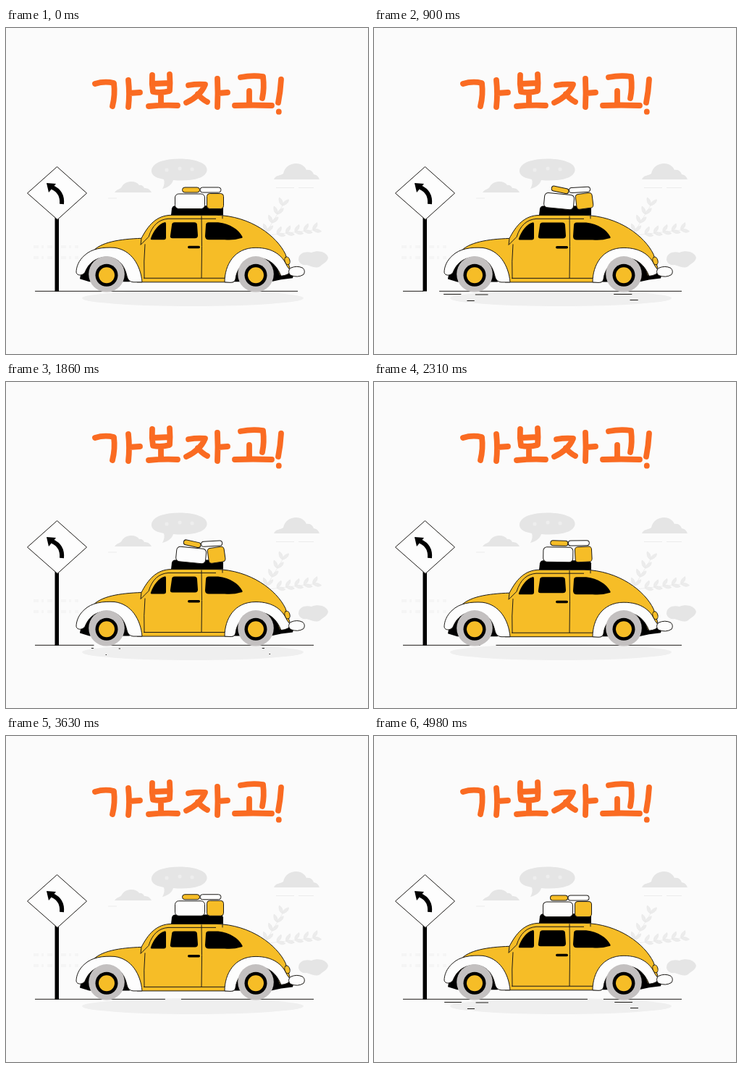
An HTML page for the animation above (5010 ms loop, 500x450 px).

```html
<!DOCTYPE html>
<html lang="ko">
<head>
<meta charset="utf-8">
<title>가보자고!</title>
<style>
html, body { margin: 0; width: 100%; height: 100%; overflow: hidden; background: #fbfbfb; }
svg { display: block; width: 100vw; height: 100vh; }
.ink { stroke: #1c1a17; stroke-width: 1; }
.yellow { fill: #f6bd27; }
.white { fill: #fdfdfd; }
.line { fill: none; }
#bags rect { transform-box: fill-box; transform-origin: center; }
</style>
</head>
<body>
<svg viewBox="0 0 500 450">
  <defs>
    <path id="leaf" d="M0 0C2 -4 6 -5 11 -4C9 0 5 1 0 0Z"/>
    <g id="wheel">
      <circle r="24.8" cy="-1.5" fill="#c3c0c0"/>
      <circle r="15.5"/>
      <circle r="11" class="yellow"/>
    </g>
  </defs>

  <!-- lettering -->
  <g role="img" aria-label="가보자고!" fill="none" stroke="#fa6b22" stroke-width="7.8" stroke-linecap="round" stroke-linejoin="round">
    <path d="M123 77Q136 73 149 76Q151 92 147 108M169 72Q171 91 169 109M170 90L185 89"/>
    <path d="M202 65Q201 77 203 88Q214 90 226 87Q227 76 226 64M203 77L226 76M214 90V106M197 108Q218 106 237 107"/>
    <path d="M252 79Q264 77 275 78C271 88 262 97 249 103M265 91Q270 98 278 102M292 70Q293 90 292 109M293 90L306 89"/>
    <path d="M324 68Q340 65 355 67Q357 83 354 97M336 87V105M316 107Q341 106 367 107"/>
    <path d="M380 71Q379 88 376 103M376.8 115.5V115.7"/>
  </g>

  <!-- pale scenery -->
  <g fill="#e5e5e5">
    <path d="M210 207C196 202 199 189 214 184C232 178 259 180 270 186C282 192 279 203 267 207C256 211 242 211 231 210C229 216 224 220 216 222Q220 215 218 209Z"/>
    <path d="M150 227C153 222 158 223 160 219C164 211 179 209 184 217C188 216 190 219 191 221C196 221 199 223 201 227Z"/>
    <path d="M370 209C372 203 379 204 383 201C386 185 409 182 415 196C421 195 424 199 425 202C430 203 432 206 433 209Z"/>
    <path d="M404 320C404 310 414 308 422 310C431 306 443 309 445 317C444 323 438 325 434 329C427 333 420 328 415 327C410 328 405 325 404 320Z"/>
  </g>
  <path d="M141 235H153M373 220.5H398M404 220.5H425" stroke="#ebebeb"/>
  <path d="M222 196h.1M240 194h.1M257 195h.1" stroke="#eeeeee" stroke-width="5" stroke-linecap="round"/>
  <ellipse cx="258" cy="373" rx="153" ry="11" fill="#efefef"/>
  <path d="M38 302H100M38 317H100" class="line" stroke="#f5f5f5" stroke-width="4" stroke-dasharray="7 4 3 5"/>
  <g id="plants" fill="#ececec" stroke="#e8e8e8" stroke-width=".7"></g>

  <!-- road -->
  <path id="road" d="M40 363.3H425" class="ink line" stroke-dasharray="363 22"/>
  <g id="dashes" class="ink">
    <path pathLength="1" d="M95 367.5H121"/>
    <path pathLength="1" d="M139 368H158"/>
    <path pathLength="1" d="M128 376.5H139"/>
    <path pathLength="1" d="M330 367.5H357"/>
    <path pathLength="1" d="M353 375.5H365"/>
  </g>

  <!-- sign -->
  <path d="M67.5 262H73V363.5H67.5Z"/>
  <path d="M70.5 191.5L111.5 228L71 264.5L29.5 228Z" class="ink white"/>
  <path d="M77 243C78 232 73 224 64 220" class="line" stroke="#000" stroke-width="6"/>
  <path d="M56 214L69 215L59 227Z"/>

  <!-- car -->
  <g id="car" stroke-linejoin="round">
    <path d="M102 346C105 325 119 312 140 312C157 313 168 328 171 350H115Z"/>
    <path d="M314 350C314 326 327 312 347 312C364 313 375 326 380 338H398L396 345L380 347L366 350Z"/>
    <path d="M119 309C130 295 158 291 187 290C196 273 207 258 229 258H290C338 259 374 287 386 312L392 331L378 341C373 322 363 313 346 314C326 314 314 330 314 350.5H181C176 326 160 309 119 309Z" class="ink yellow"/>
    <path d="M187 290L186 299M190 345H303M270 259Q271 300 270 345M299 258V263M192 298Q190 322 191 345M186 299Q193 292 197 288C202 272 211 264 224 263H290" class="ink line" stroke-width=".7"/>
    <path d="M200 290C204 279 211 270 219 268Q221 267 221 271V289Q221 292 218 292H202Q199 292 200 290Z"/>
    <path d="M233 268H260Q264 268 264 272L265 286Q265 290 261 290H230Q226 290 227 286L229 272Q229 268 233 268Z"/>
    <path d="M280 268H293C310 270 321 278 326 287Q328 290 324 290Q315 293 302 292H280Q275 292 275 287L276 272Q276 268 280 268Z"/>
    <rect x="251" y="300.5" width="17" height="3.5" rx="1.7"/>
    <path d="M97 337C97 330 100 321 108 314C118 304 134 302 150 303C173 306 186 327 188 350.5H176C170 350 168 346 167 342C163 324 152 315 136 316C118 318 112 330 109 337C106 342 98 342 97 337Z" class="ink white"/>
    <path d="M302 350.5C302 327 315 303 345 303C369 303 382 314 388 328L393 335Q391 341 380 342C374 327 364 318 349 317C331 317 319 330 317 346Q316 351 310 351Z" class="ink white"/>
    <ellipse cx="388.5" cy="321" rx="3.5" ry="5.5" transform="rotate(-15 388.5 321)" class="ink yellow"/>
    <path d="M393 331Q402 327 410 331Q414 335 411 340Q403 345 393 341Q388 336 393 331Z" class="ink white"/>
    <path d="M228 258L229 249Q230 245 234 245H295Q299 245 300 249V258Z"/>
  </g>
  <use href="#wheel" x="139" y="341.3"/>
  <use href="#wheel" x="345" y="341.3"/>
  <g id="bags" class="ink">
    <rect class="white" data-tilt="7" x="233.5" y="229" width="41" height="20.5" rx="5"/>
    <rect class="yellow" x="277.5" y="228.5" width="23" height="21" rx="4"/>
    <rect class="yellow" data-tilt="15" x="243.5" y="220" width="24" height="7" rx="3.5"/>
    <rect class="white" data-tilt="-4" x="268" y="220" width="29" height="7" rx="3.5"/>
  </g>
</svg>
<script>
const LOOP = 5010, BEAT = 1000, DASH_CYCLE = 4 * BEAT, ROAD_SPEED = .0556;
const $ = id => document.getElementById(id);
const bags = [...$("bags").children];

function branch(x, y, dx, dy, pairs) {
  const turn = Math.atan2(dy, dx) * 180 / Math.PI;
  let parts = `<path d="M${x} ${y}l${dx} ${dy}"/>`;
  for (let i = 1; i <= pairs; i++)
    for (const side of [-1, 1]) {
      const p = i / pairs;
      parts += `<use href="#leaf" transform="translate(${x + dx * p} ${y + dy * p}) rotate(${turn + side * 35})"/>`;
    }
  $("plants").innerHTML += parts;
}
branch(353, 293, 29, -48, 4);
branch(362, 286, 62, -7, 5);

function ease(t, from, to) {
  const p = Math.min(1, Math.max(0, (t - from) / (to - from)));
  return (1 - Math.cos(Math.PI * p)) / 2;
}

function draw() {
  const t = performance.now() % LOOP, c = t % DASH_CYCLE;

  // The body sinks once per beat; the luggage jolts twice, looser as the body rises.
  const sway = Math.sin(Math.PI * t / BEAT) ** 2;
  const jolt = Math.max(0, -Math.sin(4 * Math.PI * t / BEAT)) ** 3;
  const loose = jolt * (1 - .8 * sway);

  $("road").setAttribute("stroke-dashoffset", -t * ROAD_SPEED);
  $("car").setAttribute("transform", `translate(0 ${.3 + 1.3 * sway})`);

  for (const bag of bags) {
    const tilt = bag.dataset.tilt ? bag.dataset.tilt * loose : -8.5 * jolt;
    bag.style.transform = `translate(${2 * loose}px, ${-1.5 * sway}px) rotate(${tilt}deg)`;
  }

  const head = ease(c, 0, 1000), tail = ease(c, 700, 2200);
  $("dashes").setAttribute("stroke-dasharray", `0 ${tail} ${head - tail} 2`);
  requestAnimationFrame(draw);
}
draw();
</script>
</body>
</html>
```
